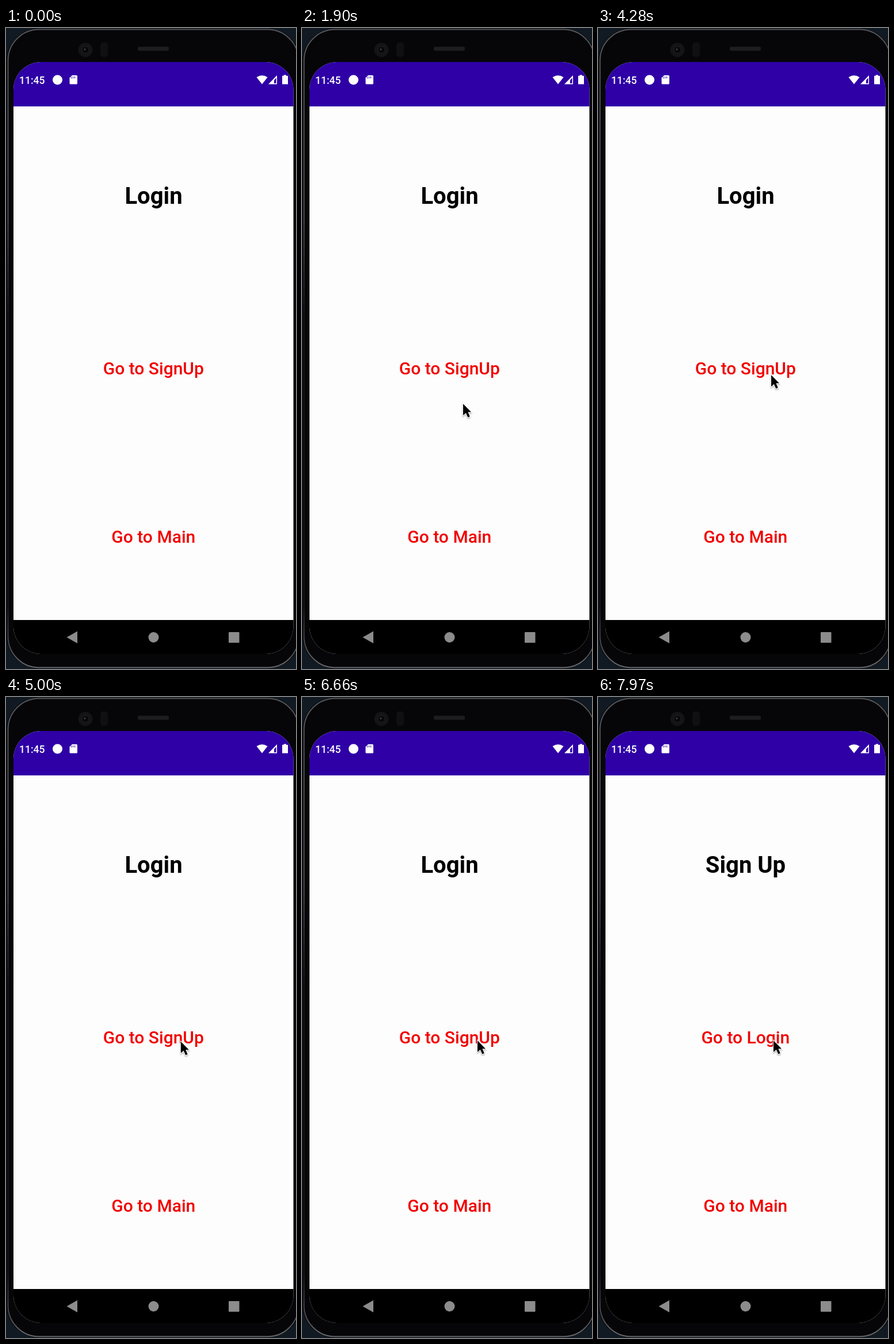
These frames come from a looping animation (504 by 1112 pixels, 7990 ms). An HTML page:

```html
<!DOCTYPE html>
<html lang="en">
<head>
<meta charset="utf-8">
<title>Login navigation</title>
<style>
html, body { margin: 0; width: 100%; height: 100%; overflow: hidden; background: #111a22; }
svg { display: block; width: 504px; height: 1112px; }
text { font-family: Roboto, sans-serif; font-weight: 500; font-size: 30px; text-anchor: middle; fill: #f20000; }
.title { font-weight: 700; font-size: 40px; fill: #000; }
.clock { font-size: 17.5px; text-anchor: start; fill: #fff; }
</style>
</head>
<body>
<svg viewBox="0 0 504 1112">
  <defs>
    <linearGradient id="rim" x1="0" y1="0" x2="0" y2="1">
      <stop offset="0" stop-color="#55565a"/>
      <stop offset=".3" stop-color="#505155"/>
      <stop offset=".45" stop-color="#17171a"/>
      <stop offset=".9" stop-color="#17171a"/>
      <stop offset="1" stop-color="#68696c"/>
    </linearGradient>
    <clipPath id="screen"><rect x="13" y="59" width="486.500" height="1027" rx="48"/></clipPath>
    <clipPath id="button"><rect x="170" y="569" width="173" height="39"/></clipPath>
    <filter id="shadow" x="-50%" y="-50%" width="200%" height="200%">
      <feDropShadow dx="0" dy="1.500" stdDeviation="1.300" flood-opacity=".4"/>
    </filter>
  </defs>

  <rect width="504" height="1112" fill="#111a22"/>
  <rect x="1" y="1" width="510" height="1110" rx="56" fill="#030305"/>
  <rect x="3.500" y="2.500" width="505" height="1107" rx="54" fill="#060609" stroke="url(#rim)" stroke-width="2"/>

  <g fill="#141416">
    <circle cx="138" cy="38" r="12.500"/>
    <rect x="164" y="25" width="13" height="25" rx="5" fill="#101012"/>
    <rect x="229" y="32.500" width="54" height="7" rx="2" fill="#1d1d1f"/>
  </g>
  <circle cx="138" cy="38" r="6" fill="#08080a" stroke="#222225"/>
  <circle cx="137" cy="37" r="1.500" fill="#48484b"/>

  <g clip-path="url(#screen)">
    <rect x="13" y="59" width="487" height="1027" fill="#fdfdfd"/>
    <rect x="13" y="59" width="487" height="77" fill="#2e00a6"/>
    <rect x="13" y="1027" width="487" height="60"/>
  </g>

  <g fill="#fff">
    <text class="clock" x="23" y="97">11:45</text>
    <circle cx="89.500" cy="90" r="8.500"/>
    <path d="M115 82H122.500Q124 82 124 83.500V96Q124 97.500 122.500 97.500H112Q110.500 97.500 110.500 96V86.500Z"/>
    <path d="M435.500 85.500Q445 79 454.500 85.500L445 97.500Z"/>
    <path d="M456 97.500L471 82V97.500Z"/>
    <path d="M482.500 83V81.500H487V83H490V97.500H480V83Z"/>
  </g>
  <path d="M466 90.500L469.500 86.500V96H466Z" fill="#2e00a6"/>
  <path d="M113.500 84.500V87.500M116.500 84V87.500M119.500 84V87.500" stroke="#2e00a6"/>

  <g fill="#8c8c8c">
    <path d="M105.500 1057L124 1046.500V1067.500Z"/>
    <circle cx="256.500" cy="1057" r="9"/>
    <rect x="387" y="1048" width="18.500" height="18.500" rx="1"/>
  </g>

  <g id="login">
    <text class="title" x="256.500" y="305">Login</text>
    <text x="256.300" y="600.500">Go to SignUp</text>
    <g clip-path="url(#button)"><circle id="ripple"/></g>
  </g>
  <g id="signup">
    <text class="title" x="256.500" y="305">Sign Up</text>
    <text x="256.300" y="600.500">Go to Login</text>
  </g>
  <text x="256.300" y="892.500">Go to Main</text>

  <path id="cursor" d="M0 0V20L4.800 15.700L8.300 23.500L11.800 22L8.400 14.300H14Z"
        stroke="#fff" stroke-width="1.800" paint-order="stroke" filter="url(#shadow)"/>
</svg>
<script>
const LOOP = 7990, SHOW = 900, PRESS = 7310, SWITCH = 7550;
// time, x, y of the pointer tip
const path = [[900, 268, 688], [1900, 280, 652], [3200, 292, 619], [4280, 301, 602], [5300, 305, 596]];

const $ = id => document.getElementById(id);
const set = (el, attrs) => Object.entries(attrs).forEach(([k, v]) => el.setAttribute(k, v));
const clamp = v => Math.max(0, Math.min(1, v));
const mix = (a, b, p) => a + (b - a) * p;
const easeOut = p => 1 - (1 - p) ** 2;

function pointAt(t) {
  const i = path.findIndex(p => p[0] > t);
  if (i < 0) return path.at(-1).slice(1);
  if (i === 0) return path[0].slice(1);
  const [t0, x0, y0] = path[i - 1], [t1, x1, y1] = path[i];
  const p = (t - t0) / (t1 - t0);
  return [mix(x0, x1, p), mix(y0, y1, p)];
}

function draw(t) {
  const [x, y] = pointAt(t);
  set($('cursor'), { transform: `translate(${x} ${y})`, visibility: t < SHOW ? 'hidden' : 'visible' });

  // The ripple grows while its centre drifts from the pointer to the button's middle.
  const grow = clamp((t - PRESS) / 225);
  set($('ripple'), {
    cx: mix(305, 256.5, grow),
    cy: mix(597, 588.5, grow),
    r: mix(52, 102, easeOut(grow)),
    opacity: 0.15 * clamp((t - PRESS) / 75) * (1 - clamp((t - SWITCH) / 150))
  });

  const fade = clamp((t - SWITCH) / 300);
  set($('login'), { opacity: 1 - fade });
  set($('signup'), { opacity: fade });
}

function tick() {
  draw(performance.now() % LOOP);
  requestAnimationFrame(tick);
}
tick();
</script>
</body>
</html>
```
